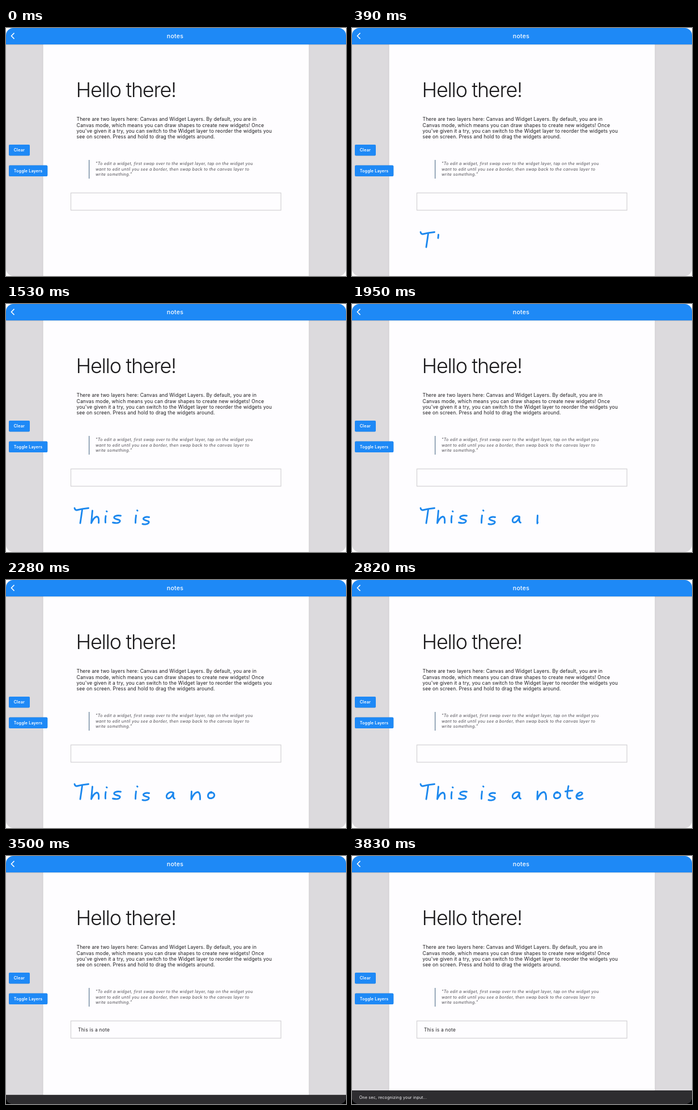
Animation of 600x438 px, one loop 4330 ms. Source, as an HTML page:

```html
<!DOCTYPE html>
<html lang="en">
<head>
<meta charset="utf-8">
<title>notes</title>
<style>
  html, body { margin: 0; width: 100%; height: 100%; overflow: hidden; background: #fff; }
  svg { display: block; width: 600px; height: 438px; }
  text {
    font-family: Inter, "Open Sans", "Liberation Sans", sans-serif;
    font-optical-sizing: none;
    white-space: pre;
  }
  .title { font-size: 10.5px; font-weight: 500; letter-spacing: .3px; fill: #fff; text-anchor: middle; }
  .heading { font-size: 36px; font-weight: 300; letter-spacing: -1.31px; fill: #1b1a1c; }
  .body { font-size: 8.5px; letter-spacing: .175px; fill: #1a191c; }
  .quote { font-size: 7.2px; font-style: italic; letter-spacing: .295px; fill: #4c4b51; }
  .label { font-size: 7.1px; font-weight: 600; letter-spacing: .2px; fill: #fff; }
  .note { font-size: 8.4px; letter-spacing: .25px; fill: #222124; }
  .message { font-size: 7.2px; letter-spacing: .15px; fill: #f4f3f5; }
  .blue { fill: #1e89f6; }
  .button { filter: drop-shadow(0 .6px .6px rgba(0, 0, 0, .22)); }
  .bar { filter: drop-shadow(0 .6px 1px rgba(0, 0, 0, .3)); }
  .page { filter: drop-shadow(0 0 1px rgba(0, 0, 0, .15)); }
  #ink { fill: none; stroke: #1c88ee; stroke-width: 2.9; stroke-linecap: round; stroke-linejoin: round; }
  #note, #snack, #message { opacity: 0; }
</style>
</head>
<body>
<svg viewBox="0 0 600 438">
  <defs>
    <clipPath id="screen"><rect width="600" height="438" rx="13"/></clipPath>
  </defs>
  <g clip-path="url(#screen)">
    <rect width="600" height="438" fill="#dcdadd"/>
    <rect class="page" x="65.5" y="20" width="469" height="430" fill="#fefdff"/>

    <rect class="blue bar" width="600" height="29"/>
    <path d="M14.500 8.900 9.400 14 14.500 19.100" fill="none" stroke="#fff" stroke-width="1.5"/>
    <text class="title" x="298.5" y="17.8">notes</text>

    <text class="heading" x="123.6" y="122">Hello there!</text>

    <g class="body">
      <text x="124.5" y="164.1">There are two layers here: Canvas and Widget Layers. By default, you are in</text>
      <text x="124.5" y="174.5">Canvas mode, which means you can draw shapes to create new widgets! Once</text>
      <text x="124.5" y="184.9">you've given it a try, you can switch to the Widget layer to reorder the widgets you</text>
      <text x="124.5" y="195.3">see on screen. Press and hold to drag the widgets around.</text>
    </g>

    <rect x="146" y="233" width="1.3" height="33" fill="#67809a"/>
    <g class="quote">
      <text x="157.9" y="242.4">“To edit a widget, first swap over to the widget layer, tap on the widget you</text>
      <text x="157.9" y="251.7">want to edit until you see a border, then swap back to the canvas layer to</text>
      <text x="157.9" y="261">write something.”</text>
    </g>

    <rect x="114.5" y="291.3" width="370.7" height="30.5" fill="none" stroke="#d2d1d4" stroke-width="1.2"/>
    <text class="note" id="note" x="127" y="309.5">This is a note</text>

    <rect class="blue button" x="5" y="206" width="37" height="19.5" rx="2"/>
    <text class="label" x="13.7" y="218.2">Clear</text>
    <rect class="blue button" x="5" y="242.5" width="68.3" height="19.5" rx="2"/>
    <text class="label" x="13.7" y="254.8">Toggle Layers</text>

    <g id="ink"></g>

    <g id="snack">
      <rect y="414" width="600" height="40" fill="#2e2d30"/>
      <text class="message" id="message" x="12.7" y="428.7">One sec, recognizing your input...</text>
    </g>
  </g>
</svg>
<script>
  const LOOP = 4330, RECOGNISED = 3300, SNACK = 3500;

  // Pen strokes in writing order: start ms, end ms, path
  const strokes = [
    [50, 170, "M121 360.5Q122 364.500 125 364Q134 361.500 145.500 360.500"],
    [200, 310, "M134.500 363Q133 374 131 387"],
    [370, 540, "M152.500 365Q151.500 376 150.500 387Q155 376.500 160 375.500Q164.500 375.500 163.500 386.500"],
    [580, 650, "M176 374.500Q175 380 175.500 386"],
    [680, 700, "M177.500 366L178 366.500"],
    [720, 850, "M202.500 374C196 372.500 188.500 375 191.500 378.500C194.500 381 202.500 380.500 201 384C199.500 387.500 193 387 188.500 386"],
    [1080, 1170, "M229.500 373.500Q228.500 380 228.500 386.500"],
    [1210, 1230, "M231.500 364.500L232 365"],
    [1290, 1500, "M252.500 376.500C247 375 240.500 377.500 243 380.500C245.500 383 253.500 382.500 252 386C250.500 389.500 244.500 389.500 241 388.500"],
    [1620, 1830, "M295 375.500C290 373 285 376.500 283.500 380.500C282.500 386 286 387 290 384.500C293 382 294.500 379 295.500 376C295 381 294.500 385.500 297.500 386"],
    [1900, 2050, "M327.500 373.500Q327 380.500 327 387.500Q331.500 375.500 338 374.500Q343 374.500 342.500 387.500"],
    [2100, 2260, "M362.500 374.500C357 375.500 355.500 380.500 357 383.500C359 387 366 386 367.500 381.500C368.500 377.500 365.500 374.500 361.500 376"],
    [2340, 2450, "M382 364C380.500 371.500 379.500 377.500 380 382.500Q381 387 385.500 385.500"],
    [2490, 2550, "M376.500 373.500Q383 372 389 372"],
    [2600, 2780, "M397 381.500C402 381.500 407.500 379 406 376C403.500 373 397 377 396 381.500C395.500 387.500 402 388 407 386"]
  ];

  // Frames are [ms, properties]
  function loop(el, ...frames) {
    const keys = frames.map(([ms, props]) => ({ offset: ms / LOOP, ...props }));
    el.animate(keys, { duration: LOOP, iterations: Infinity });
  }

  function toggle(el, on, off = LOOP) {
    const frames = [[0, { opacity: 0 }], [on, { opacity: 0 }], [on, { opacity: 1 }], [off, { opacity: 1 }]];
    if (off < LOOP) frames.push([off, { opacity: 0 }], [LOOP, { opacity: 0 }]);
    loop(el, ...frames);
  }

  const $ = id => document.getElementById(id);

  for (const [start, end, d] of strokes) {
    const path = document.createElementNS("http://www.w3.org/2000/svg", "path");
    path.setAttribute("d", d);
    path.setAttribute("pathLength", 1);
    path.style.strokeDasharray = "1 2";
    $("ink").append(path);
    toggle(path, start, RECOGNISED);
    loop(path,
      [0, { strokeDashoffset: 1 }], [start, { strokeDashoffset: 1 }],
      [end, { strokeDashoffset: 0 }], [LOOP, { strokeDashoffset: 0 }]);
  }

  toggle($("note"), RECOGNISED);
  toggle($("snack"), SNACK);
  loop($("snack"),
    [0, { transform: "translateY(9px)" }],
    [SNACK, { transform: "translateY(9px)", easing: "cubic-bezier(0, .5, .3, 1)" }],
    [SNACK + 150, { transform: "translateY(0px)" }],
    [LOOP, { transform: "translateY(0px)" }]);
  loop($("message"),
    [0, { opacity: 0 }], [SNACK + 40, { opacity: 0 }],
    [SNACK + 200, { opacity: 1 }], [LOOP, { opacity: 1 }]);
</script>
</body>
</html>
```
